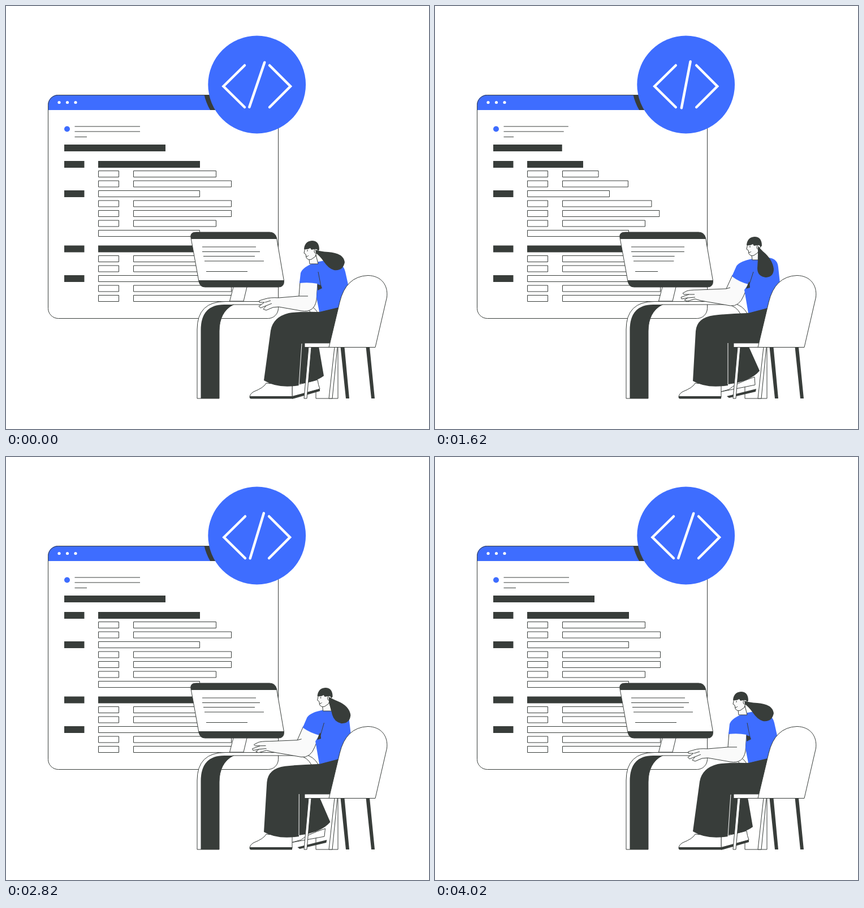
An HTML page for the animation above (4.38 s loop, 748x748 px).

```html
<!DOCTYPE html>
<html lang="en">
<head>
<meta charset="utf-8">
<title>Coding at a desk</title>
<style>
  html, body { margin: 0; width: 100%; height: 100%; overflow: hidden; background: #fff; }
  svg { display: block; width: 100vw; height: 100vh; }
  .line { fill: none; stroke: #383d3a; stroke-width: 1; stroke-linejoin: round; }
  .paper { fill: #fff; stroke: #383d3a; stroke-width: 1; stroke-linejoin: round; }
  .skin { fill: #fafafa; stroke: #383d3a; stroke-width: 1; stroke-linejoin: round; }
  .dark { fill: #383d3a; }
  .blue { fill: #3e6dff; }
  .white { fill: #fff; }
  .mark { fill: none; stroke: #fff; stroke-width: 4.5; stroke-linecap: round; }
</style>
</head>
<body>
<svg viewBox="0 0 748 748">
  <defs>
    <clipPath id="windowClip"><rect x="74" y="157" width="408" height="395" rx="18"/></clipPath>
    <clipPath id="monitorClip"><path id="monitorShape" d="M336 400H466Q476 400 478.500 410L491.500 486Q492 497 482 497H352Q343 497 341 487L327 410Q325 400 336 400Z"/></clipPath>
  </defs>

  <g id="window">
    <rect class="white" x="74.500" y="157.500" width="407" height="395" rx="18"/>
    <g clip-path="url(#windowClip)">
      <rect class="blue" x="74" y="157" width="408" height="27"/>
      <path class="dark" d="M350.400 157Q354 172 361.100 184H380V157Z"/>
    </g>
    <rect class="line" x="74.500" y="157.500" width="407" height="395" rx="18"/>
    <g class="white"><circle cx="94" cy="170.500" r="2.600"/><circle cx="108.500" cy="170.500" r="2.600"/><circle cx="123" cy="170.500" r="2.600"/></g>
    <circle class="blue" cx="108" cy="217.500" r="5"/>
    <g id="rows"></g>
  </g>

  <g id="badge">
    <circle class="blue" cx="443.700" cy="139" r="86.400"/>
    <path id="bracketLeft" class="mark" d="M422 105L384.500 142L422 179"/>
    <path id="bracketRight" class="mark" d="M466 105L503 142L466 179"/>
    <path id="slash" class="mark" d="M443.700 97.500V181"/>
  </g>

  <g id="desk">
    <path class="paper" d="M548 694V600H587V694Z"/>
    <path class="paper" d="M338 694V572Q338 522.500 388 522.500H508Q544 524 553 546H541Q533 529 515 528H401Q377 542 377 575V694Z"/>
    <path class="dark" d="M344.500 694V573Q344.500 528 386 528H403Q377 541 377 574V694Z"/>
    <path class="paper" d="M402 497L395.500 522H420L426 497"/>
    <use href="#monitorShape" class="white"/>
    <g clip-path="url(#monitorClip)">
      <rect class="dark" x="320" y="399" width="180" height="13"/>
      <rect class="dark" x="320" y="485" width="180" height="13"/>
    </g>
    <use href="#monitorShape" class="line"/>
    <g id="screenLines"></g>
  </g>

  <g id="person"></g>

  <g id="chair">
    <path class="paper" d="M535 603L527 694H532L540 603ZM581 603L571 694H577L586 603Z"/>
    <path class="dark" d="M591.500 603H598.500L607 694H601ZM636.500 603H643L652 694H646Z"/>
    <path class="paper" d="M528 596H575L572 603.500H528Z"/>
    <path class="paper" d="M571 603.500L590 524Q601 478 640 476.500C664 477 676 494 673.500 515L653 603.500Z"/>
  </g>
</svg>

<script>
const FRAME = 60, LOOP = 4380, LAST = 4020;
const $ = id => document.getElementById(id);
const lerp = (a, b, k) => a + (b - a) * k;
const ease = k => (1 - Math.cos(Math.PI * Math.min(1, Math.max(0, k)))) / 2;

function add(parent, tag, attrs) {
  const node = document.createElementNS("http://www.w3.org/2000/svg", tag);
  for (const name in attrs) node.setAttribute(name, attrs[name]);
  return parent.appendChild(node);
}

// Evenly spaced or explicit keys, linear in between.
function keyed(times, values, t) {
  if (t <= times[0]) return values[0];
  const i = times.findIndex(time => time > t);
  if (i < 0) return values[values.length - 1];
  return lerp(values[i - 1], values[i], (t - times[i - 1]) / (times[i] - times[i - 1]));
}

// Code rows: each one shrinks and grows again, one after the other.
const STAGGER = 66.7;
const PULSE = [1, .99, .91, .81, .67, .435, .55, .68, .82, .92, .99, 1];
const PULSE_KEYS = PULSE.map((_, i) => i);
const pulse = (t, i) => keyed(PULSE_KEYS, PULSE, 10 + (t - 1620) / STAGGER - i);

const bars = [];
function stroke(parent, x, y, end, index) {
  const node = add(parent, "line", { class: "line", x1: x, y1: y, x2: end, y2: y });
  bars.push({ index, set: k => node.setAttribute("x2", x + (end - x) * k) });
}
function box(kind, x, y, end) {
  return add($("rows"), "rect", kind === "dark"
    ? { class: kind, x, y: y - 6, width: end - x, height: 12 }
    : { class: kind, x: x + .5, y: y - 5.5, width: end - x - 1, height: 11 });
}
function row(kind, x, y, end, index) {
  const node = box(kind, x, y, end), full = +node.getAttribute("width");
  bars.push({ index, set: k => node.setAttribute("width", full * k) });
}

[[213, 237], [222, 237], [231.5, 143]].forEach(([y, end], i) => stroke($("rows"), 121.5, y, end, i));
row("dark", 103, 251, 282, 3);
for (const y of [280, 332, 429.5, 482]) box("dark", 103, y, 138.5);
[
  [280, "dark", 163, 343], [297, "line", 225, 372], [314.5, "line", 225, 399],
  [332, "line", 163, 343], [349.5, "line", 225, 399], [367, "line", 225, 399],
  [384.5, "line", 225, 372], [402, "line", 163, 343], [429.5, "dark", 163, 343],
  [447, "line", 225, 372], [464.5, "line", 225, 399], [482, "line", 163, 343],
  [499.5, "line", 225, 399], [517, "line", 225, 399]
].forEach(([y, kind, x, end], i) => {
  if (x === 225) box("line", 163, y, 200);
  row(kind, x, y, end, i + 4);
});
[[347, 426, 442], [347, 434.5, 449], [349, 442.5, 440], [351, 451, 456], [354, 469.5, 427]]
  .forEach(([x, y, end], i) => stroke($("screenLines"), x, y, end, i));

// Body parts blend between a leaning and an upright outline.
const morphs = [];
function blend(a, b, k) {
  const target = b.match(/-?[\d.]+/g);
  let i = 0;
  return a.replace(/-?[\d.]+/g, n => lerp(+n, +target[i++], k).toFixed(2));
}
function morph(parent, kind, lean, upright, part = "body") {
  morphs.push({ node: add(parent, "path", { class: kind }), lean, upright, part });
}

const person = $("person");
morph(person, "paper",
  "M506 672L551 661Q552 670 555 677L506 691Z",
  "M506 682Q520 678 530 668L565 656Q566 670 568 678L506 691Z");
morph(person, "dark",
  "M506 690L555 677L555 681L506 695Z",
  "M516 690L568 677L567 682L520 693Z");
add(person, "path", { class: "paper", d: "M460 667Q456 675 438 682Q431 686 431 692H506V670Z" });
add(person, "path", { class: "dark", d: "M431 690H506V694.500H433Q430 694 431 690Z" });
morph(person, "dark",
  "M522 596L552 596L562 654Q546 666 518 668Z",
  "M518 596L552 596L574 645Q558 664 518 669Z");
morph(person, "dark",
  "M468 574Q472 550 500 543Q520 540 552 541L592 531L576 597L523 597L518 671Q480 677 456 662Z",
  "M461 575Q463 551 493 547Q520 544 552 543L592 532L576 597L518 597L518 671Q480 677 456 663Z");
const seam = add(person, "path", { fill: "none", stroke: "#fff", "stroke-width": 1 });
morphs.push({ node: seam, lean: "M523 597L518 671", upright: "M518 596L518 669", part: "body" });

const head = add(person, "g", {});
add(head, "path", { class: "skin", d: "M536 448L537 456H552L547 436Z" });
morph(person, "skin",
  "M520 487L518 513L482 516Q467 515 458 518L448 521L448 524L457 524L447 531L450 534L460 530L455 536L460 538L472 533L482 532L522 539Q545 543 549 520L551 489Z",
  "M526 476L515 500L465 502Q450 502 445 504L438 508L440 510L449 510L435 515L436 518L447 516L441 520L446 522L460 518L470 521L522 530Q538 532 546 512L555 490Z");
morph(person, "line",
  "M518 513L534 513M458 524L468 521M460 530L470 526",
  "M515 500L522 498M449 510L459 510M447 516L460 515");
morph(person, "blue",
  "M519 490L521 472Q525 461 548 453L575 448Q597 455 600 470L606 497L592 532L554 541L549 515L551 491Q535 488 519 490Z",
  "M525 478L533 460Q539 451 562 447L590 445Q606 447 607 462L610 490L592 533L554 543L547 502L554 492Q538 488 525 478Z");
morph(person, "dark",
  "M551 492L557 494L559 499L551 503Z",
  "M554 490L556 487L557 498L550 500Z");
morph(person, "line", "M552 470L557 496", "M563 470L556 492");

const hair = add(head, "g", {});
person.appendChild(head);
add(hair, "path", { class: "skin", d: "M529 427L527 437L530 439L531 445Q534 450 540 448L547 443L552 426Z" });
add(hair, "path", { class: "line", d: "M531 443Q534 443 535 441M533 431V434" });
add(hair, "path", { class: "dark", d: "M527 430Q528 416 541 415Q554 415 554 431L549 436L546 430L540 431L538 428Q534 431 527 430Z" });
add(hair, "path", { class: "skin", d: "M545 434Q545 428 550 430Q553 432 549 436Q546 439 545 434Z" });
morph(hair, "dark",
  "M547 431Q555 434 570 435Q597 437 599 453Q596 469 580 467Q570 464 562 452Q555 442 548 437Z",
  "M547 431Q550 435 556 441Q573 455 575 472Q575 486 561 487Q546 485 546 471Q547 457 547 445Z", "hair");

// Rise to upright, stay, then lean back.
const sway = (t, rise, start, back) => ease(t / rise) * (1 - ease((t - start) / back));

const SWING_TIMES = [0, 240, 360, 480, 840, 960, 1260];
const SWING = [0, .42, .65, 1, .42, .25, 0];

function draw(t) {
  for (const bar of bars) bar.set(pulse(t, bar.index));

  const q = keyed(SWING_TIMES, SWING, t % 1380);
  $("bracketLeft").setAttribute("transform", `translate(${9 * q} 0)`);
  $("bracketRight").setAttribute("transform", `translate(${-9 * q} 0)`);
  $("slash").setAttribute("transform", `rotate(${18.8 * (1 - q)} 443.7 139.5)`);

  const pose = {
    body: sway(t, 600, 2730, 620),
    head: sway(t, 500, 2770, 620),
    hair: sway(t, 720, 2540, 600)
  };
  for (const m of morphs) m.node.setAttribute("d", blend(m.lean, m.upright, pose[m.part]));
  head.setAttribute("transform", `translate(${24 * pose.head} ${-7 * pose.head})`);
}

let begin;
function tick(now) {
  begin ??= now;
  const t = (now - begin) % LOOP;
  draw(Math.min(LAST, Math.floor(t / FRAME) * FRAME));
  requestAnimationFrame(tick);
}
draw(0);
requestAnimationFrame(tick);
</script>
</body>
</html>
```
